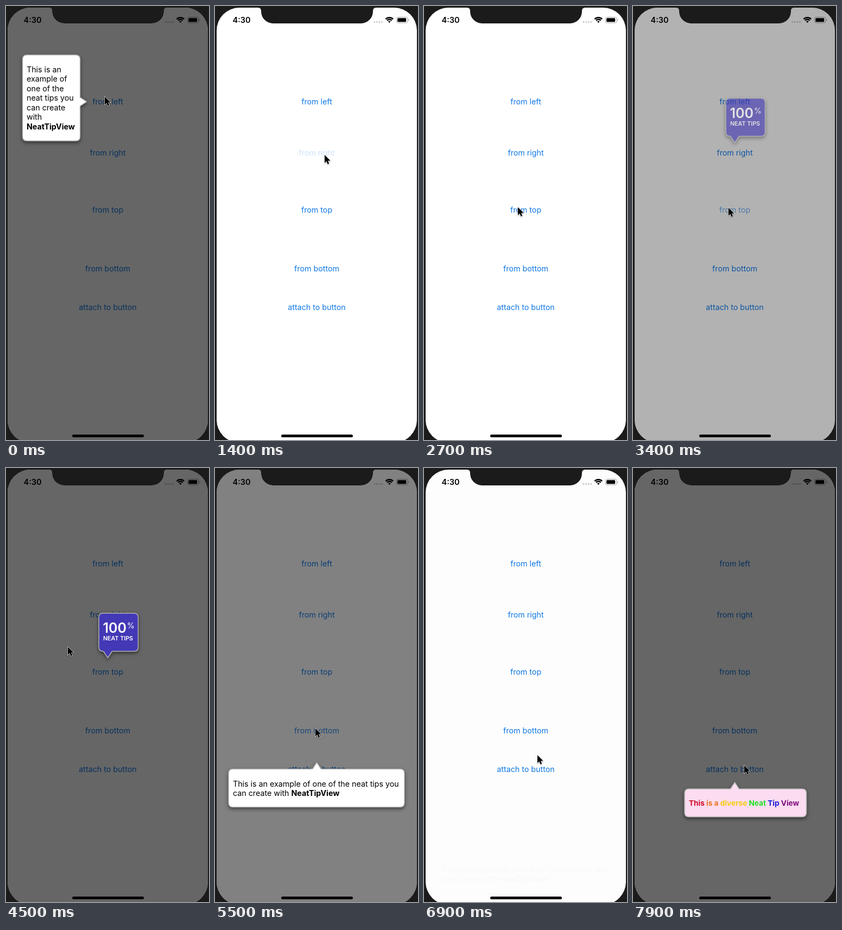
Write an HTML page that moves like this. It is 374 by 798 pixels and loops after 8000 ms.

```html
<!DOCTYPE html>
<html lang="en">
<head>
<meta charset="utf-8">
<title>Neat tips</title>
<style>
  html, body { margin: 0; width: 100%; height: 100%; overflow: hidden; background: #1b1b1b; }
  svg { display: block; font: 14.25px Inter, sans-serif; }
  .label { fill: #0f78e6; text-anchor: middle; }
  .tip { filter: drop-shadow(0 3px 3px rgba(0, 0, 0, .5)); }
  .tip path { stroke: #b2b2b2; stroke-width: 1.5; stroke-linejoin: round; }
  .bold { font-weight: 700; }
  .semi { font-weight: 600; }
</style>
</head>
<body>
<svg width="374" height="798" viewBox="0 0 374 798">
  <defs>
    <path id="screen" d="M3 45A42 42 0 0 1 45 3H79Q85 3 85 9V10A22 22 0 0 0 107 32H269A22 22 0 0 0 291 10V9Q291 3 297 3H330A42 42 0 0 1 372 45V761A42 42 0 0 1 330 803H45A42 42 0 0 1 3 761Z"/>
  </defs>
  <use href="#screen" fill="#fff"/>
  <text class="semi" x="32.5" y="31" font-size="14.5">4:30</text>
  <path d="M293.8 29.3h14" stroke="#c6c6c6" stroke-width="3" stroke-linecap="round" stroke-dasharray="0 4.6"/>
  <g fill="none" stroke="#000" stroke-width="2.3">
    <path d="M314.4 24.1a9.8 9.8 0 0 1 13.8 0M316.9 26.6a6.2 6.2 0 0 1 8.8 0"/>
    <path d="M321.3 31l-2.4-2.4a3.4 3.4 0 0 1 4.8 0z" fill="#000" stroke="none"/>
  </g>
  <rect x="334.5" y="20.5" width="20.5" height="10.5" rx="3" fill="none" stroke="#a4a4a4"/>
  <rect x="336.2" y="22.2" width="16" height="7" rx="1.5"/>
  <path d="M356.5 24v3.6q1.4-.6 1.4-1.8t-1.4-1.8z" fill="#a4a4a4"/>
  <rect x="122" y="788" width="132" height="5" rx="2.5"/>
  <g id="labels"></g>
  <use id="dim" href="#screen" fill="#000"/>
  <g id="tips"></g>
  <path id="cursor" d="M0 0V14.6L3.4 11.5 5.7 16.8 8.2 15.7 6 10.5H10.6Z" stroke="#fff" stroke-width="1.1" paint-order="stroke" style="filter: drop-shadow(0 1px 1px rgba(0, 0, 0, .35))"/>
</svg>
<script>
const LOOP = 8000, STEP = 100, FADE = 300, SLIDE = 195;
const $ = id => document.getElementById(id);

const line = (x, y, text, attrs = '') => `<text x="${x}" y="${y}" ${attrs}>${text}</text>`;
const column = (x, y, lines) => lines.map((text, i) => line(x, y + i * 17.5, text)).join('');
const name = '<tspan class="bold">NeatTipView</tspan>';
const narrow = ['This is an', 'example of', 'one of the', 'neat tips you', 'can create', 'with', name];
const rainbow = [['This', '#d40a28'], ['is a', '#ea731c'], ['diverse', '#f7cb10'],
                 ['Neat', '#1fe024'], ['Tip', '#1a1ad8'], ['View', '#7d0a7d']]
  .map(([word, color]) => `<tspan fill="${color}">${word}</tspan>`).join(' ');

// box: left, top, right, bottom; arrow: its side and position; from: entry direction
const tips = [
  { label: 'from left', y: 181, show: -1000, hide: 730, press: -1200, from: [-1, 0], fill: '#fff',
    box: [30.5, 90, 136.5, 248], arrow: ['right', 176], body: column(38, 121.5, narrow) },
  { label: 'from right', y: 274.5, show: 1490, hide: 2400, press: 1300, from: [1, 0], fill: '#fff',
    box: [242, 183, 348, 341], arrow: ['left', 269], body: column(249.5, 214.5, narrow) },
  { label: 'from top', y: 379.5, show: 3250, hide: 4500, press: 3050, from: [0, -1], fill: '#4338b5',
    box: [171, 267, 243.5, 337], arrow: ['bottom', 187.5],
    body: `<g fill="#fff">${line(178.5, 303, '100', 'class="semi" font-size="25"')}${
      line(223, 295, '%', 'font-size="14"')}${line(179, 317, 'NEAT TIPS', 'class="semi" font-size="10.7"')}</g>` },
  { label: 'from bottom', y: 487.5, show: 5283, hide: 6620, press: 5150, from: [0, 1], fill: '#fff',
    box: [25, 519, 349, 589], arrow: ['top', 187.5],
    body: column(33, 551, ['This is an example of one of the neat tips you', 'can create with ' + name]) },
  { label: 'attach to button', y: 558.5, show: 7520, hide: 9000, press: 7350, from: [0, 1], fill: '#fbdcf0',
    box: [95, 590, 319.5, 641.5], arrow: ['top', 187.5],
    body: line(103, 621, rainbow, 'class="bold" font-size="13.6"') },
];

function bubble([l, t, r, b], [side, at]) {
  const arrow = (s, d) => s === side ? d : '';
  return `M${l + 8} ${t}${arrow('top', `H${at - 8}l8-12 8 12`)}H${r - 8}q8 0 8 8` +
    `${arrow('right', `V${at - 8}l12 8-12 8`)}V${b - 8}q0 8-8 8` +
    `${arrow('bottom', `H${at + 8}l-8 12-8-12`)}H${l + 8}q-8 0-8-8` +
    `${arrow('left', `V${at + 8}l-12-8 12-8`)}V${t + 8}q0-8 8-8Z`;
}

$('labels').innerHTML = tips.map(tip => line(187.5, tip.y, tip.label, 'class="label"')).join('');
$('tips').innerHTML = tips.map(tip =>
  `<g class="tip"><path fill="${tip.fill}" d="${bubble(tip.box, tip.arrow)}"/>${tip.body}</g>`).join('');

// time, x, y
const track = [
  [0, 182, 167], [400, 256, 465], [850, 256, 465], [1300, 202, 274], [1600, 202, 274],
  [2300, 150, 420], [2450, 150, 420], [2700, 173, 370], [3500, 176, 371], [4300, 108, 327],
  [4400, 108, 327], [4500, 114, 329], [5100, 185, 479], [5500, 185, 479], [6200, 238, 460],
  [6650, 238, 460], [6900, 209, 528], [7200, 205, 547], [LOOP, 205, 547],
];

const ease = x => (1 - Math.cos(Math.PI * Math.min(1, Math.max(0, x)))) / 2;

function cursorAt(t) {
  const i = track.findIndex(key => key[0] > t);
  const [t0, x0, y0] = track[i - 1], [t1, x1, y1] = track[i];
  const k = ease((t - t0) / (t1 - t0));
  return [x0 + (x1 - x0) * k, y0 + (y1 - y0) * k];
}

function draw(t) {
  let dim = 0;
  tips.forEach((tip, i) => {
    const shown = ease((t - tip.show) / FADE);
    const p = shown * (1 - ease((t - tip.hide) / FADE));
    const [dx, dy] = tip.from.map(d => d * SLIDE * (1 - p));
    const group = $('tips').children[i];
    group.setAttribute('transform', `translate(${dx} ${dy})`);
    group.style.opacity = t < tip.hide ? Math.min(1, p * 1.25) : p;
    $('labels').children[i].style.opacity = t < tip.press ? 1 : .2 + .8 * shown;
    dim += p;
  });
  $('dim').style.opacity = .6 * Math.min(1, dim);
  $('cursor').setAttribute('transform', `translate(${cursorAt(t)})`);
}

function frame() {
  draw(Math.floor(performance.now() % LOOP / STEP) * STEP);
  requestAnimationFrame(frame);
}
frame();
</script>
</body>
</html>
```
